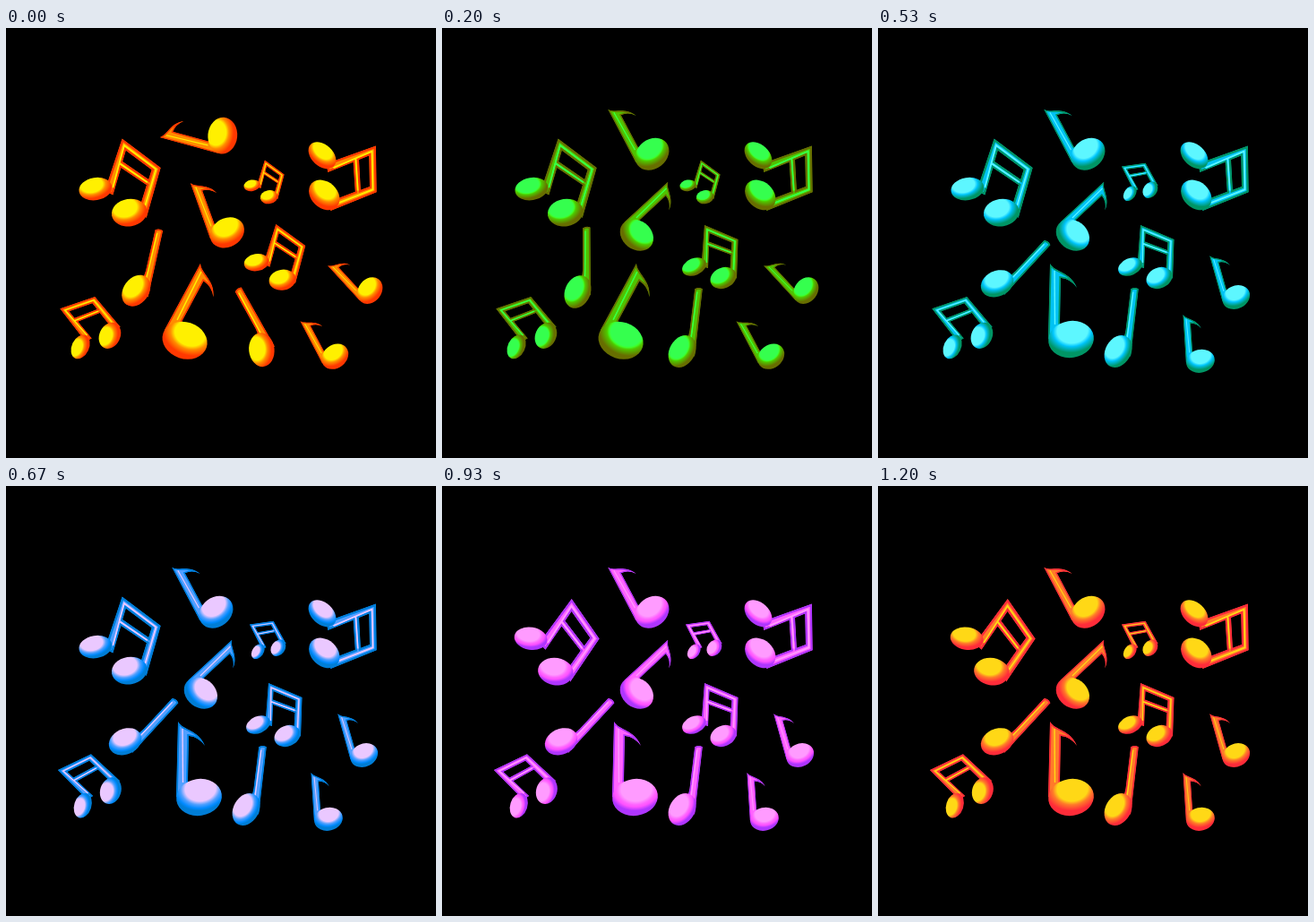
An HTML page with a canvas that plays this animation: 480 by 480 pixels, repeating every 1.27 s.

```html
<!DOCTYPE html>
<html lang="en">
<head>
<meta charset="utf-8">
<title>Dancing notes</title>
<style>
  html, body { margin: 0; height: 100%; overflow: hidden; background: #000; }
  canvas { display: block; }
</style>
</head>
<body>
<canvas id="stage" width="480" height="480"></canvas>
<script>
const canvas = document.getElementById('stage');
const ctx = canvas.getContext('2d');
const LOOP = 1270, STEPS = 19;
const LIGHT = '#fff000', MIDDLE = '#ff8c00', DARK = '#ff3800';

// Shapes start at the top of their (left) stem and turn about their pivot.
const shapes = {
  eighth: {
    pivot: [13, 52],
    body: new Path2D('M0 0C6 10 23 9 30 27Q23 17 12 16L11 66 14 84-2 84Z'),
    shine: new Path2D('M5 8L5.5 68'),
    heads: [{ x: 23.5, y: 84.5, rx: 25.5, ry: 20.5, tilt: -0.15 }],
    glow: [0.12, -0.45]
  },
  quarter: {
    pivot: [-7, 44],
    body: new Path2D('M-4 1Q0-2 4.5 0L5 76-12 66Q-4 58-4 48Z'),
    shine: new Path2D('M-1 4L-1.5 58'),
    heads: [{ x: -9.5, y: 72, rx: 14.2, ry: 19, tilt: 0.4 }],
    glow: [-0.4, -0.1]
  },
  beamed: {
    pivot: [8, 36],
    body: new Path2D('M-.5 0L37 16 35.5 60 28 50 29 33 4.5 24 3.5 48-4 46ZM5 9L4.5 18.5 29.5 28 30 19.5Z'),
    shine: new Path2D('M2 42L2.5 5 33.5 18 32 50M3 21L29 30.5'),
    heads: [
      { x: -12, y: 46.5, rx: 14, ry: 9.5, tilt: -0.4 },
      { x: 20.5, y: 59, rx: 15, ry: 11.5, tilt: -0.4 }
    ],
    glow: [-0.2, -0.4]
  }
};

// Each note stays in place and snaps to a new angle: turns maps a step to degrees added.
const note = (shape, size, x, y, angle, turns = {}) => ({ ...shapes[shape], size, x, y, angle, turns });
const notes = [
  note('beamed', 1.325, 129, 172.5, 14, { 12: 18 }),
  note('beamed', 1.27, 375.5, 160, 66),
  note('beamed', 0.66, 289, 172, 13, { 5: -44 }),
  note('beamed', 1, 301.5, 256, 13, { 2: -13 }),
  note('beamed', 1.01, 91, 334.5, -42, { 9: -7 }),
  note('eighth', 0.8, 214.5, 122, -76, { 2: 47 }),
  note('eighth', 0.785, 230, 207.5, -21, { 1: 67 }),
  note('eighth', 1, 205, 315, 27, { 5: -27 }),
  note('eighth', 0.625, 387.5, 283, -44, { 7: 27 }),
  note('eighth', 0.63, 351.5, 352, -29, { 7: 24 }),
  note('quarter', 1, 154, 266.5, 13, { 3: -13, 8: 43 }),
  note('quarter', 1, 274, 333.5, -29, { 1: 36 })
];

function drawHead({ x, y, rx, ry, tilt }, [gx, gy]) {
  ctx.save();
  ctx.translate(x, y);
  ctx.rotate(tilt);
  ctx.scale(rx, ry);
  const shade = ctx.createRadialGradient(gx, gy, 0, gx, gy, 1.4);
  shade.addColorStop(0.48, LIGHT);
  shade.addColorStop(0.62, MIDDLE);
  shade.addColorStop(0.85, DARK);
  ctx.fillStyle = shade;
  ctx.beginPath();
  ctx.arc(0, 0, 1, 0, 2 * Math.PI);
  ctx.fill();
  ctx.restore();
}

function strokeLine(path, color, width) {
  ctx.strokeStyle = color;
  ctx.lineWidth = width;
  ctx.stroke(path);
}

function drawNote({ pivot, body, shine, heads, glow, size, x, y, angle, turns }, step) {
  for (const at in turns) if (step >= at) angle += turns[at];
  ctx.save();
  ctx.translate(x, y);
  ctx.rotate(angle * Math.PI / 180);
  ctx.scale(size, size);
  ctx.translate(-pivot[0], -pivot[1]);
  ctx.save();
  ctx.clip(body, 'evenodd');
  ctx.fillStyle = MIDDLE;
  ctx.fill(body, 'evenodd');
  strokeLine(body, DARK, 3.5);
  strokeLine(shine, LIGHT, 1.4);
  ctx.restore();
  heads.forEach(head => drawHead(head, glow));
  ctx.restore();
}

// Three steps fill every 200 ms.
function stepAt(t) {
  const rest = t % 200;
  return 3 * Math.floor(t / 200) + (rest >= 70) + (rest >= 130);
}

function frame() {
  const step = stepAt(performance.now() % LOOP);
  ctx.clearRect(0, 0, 480, 480);
  notes.forEach(item => drawNote(item, step));
  canvas.style.filter = `hue-rotate(${360 * step / STEPS}deg)`;
  requestAnimationFrame(frame);
}
frame();
</script>
</body>
</html>
```
